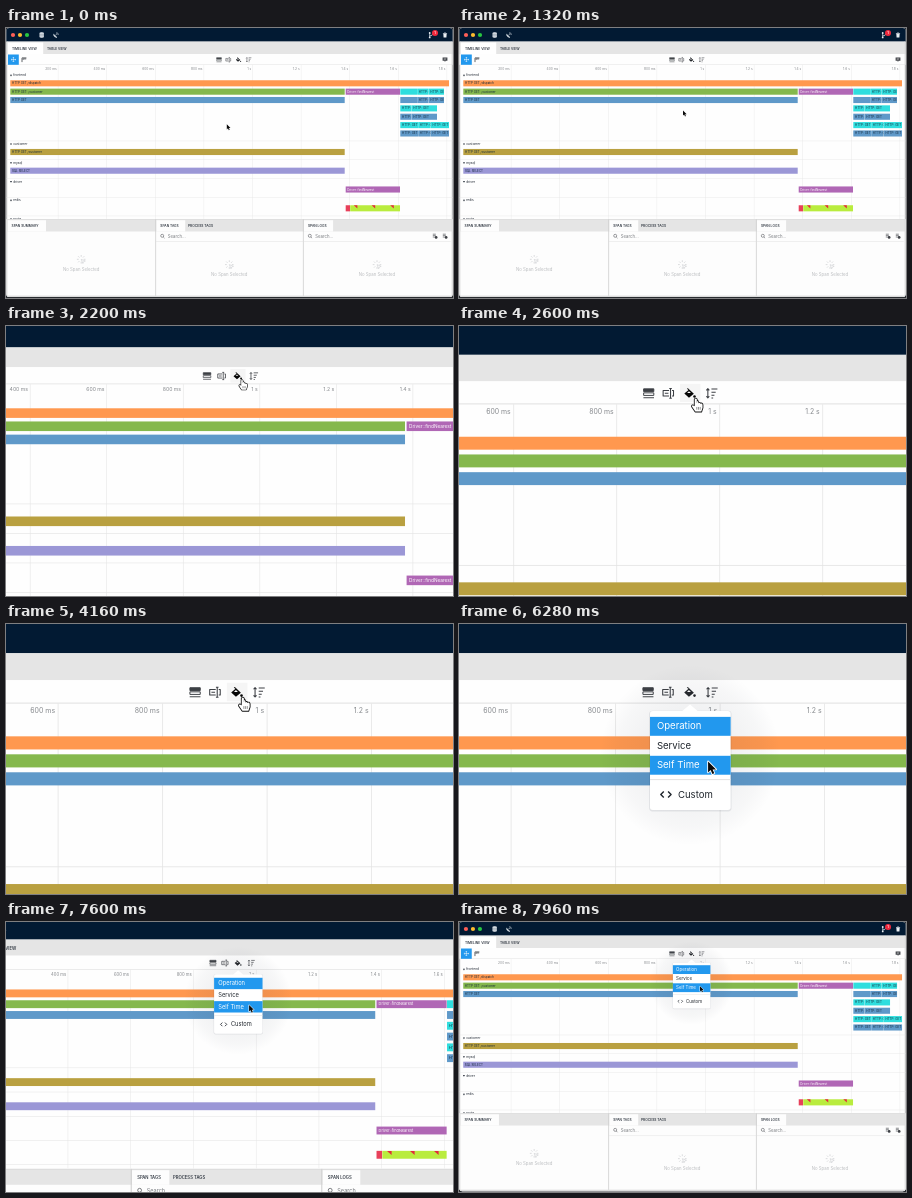
An HTML page with a canvas for the animation above (8 s loop, 447 by 270 pixels).

```html
<!DOCTYPE html>
<html lang="en">
<head>
<meta charset="utf-8">
<title>Trace timeline</title>
<style>
html, body { margin: 0; width: 100%; height: 100%; overflow: hidden; background: #fff; }
canvas { display: block; width: 447px; height: 270px; }
</style>
</head>
<body>
<canvas id="stage"></canvas>
<script>
const W = 447, H = 270, LOOP = 8000, STEP = 40;
const canvas = document.getElementById('stage');
const ctx = canvas.getContext('2d');
const dpr = window.devicePixelRatio || 1;
canvas.width = W * dpr;
canvas.height = H * dpr;

const C = {
  navy: '#021a33', grey: '#e5e5e5', line: '#dadada', ink: '#1d2530', icon: '#3c3f44',
  blue: '#2298ee', orange: '#ff984f', green: '#85b84d', steel: '#5f99c9', gold: '#b9a040',
  lavender: '#9b97d6', purple: '#b067b5', cyan: '#2fdede', lime: '#b9ec3e', red: '#e8405a'
};

// Motion
const progress = (t, a, b) => Math.min(1, Math.max(0, (t - a) / (b - a)));
const easeInOut = u => u < 0.5 ? 2 * u * u : 1 - 2 * (1 - u) * (1 - u);
const easeOutBack = u => 1 + 2 * (u - 1) ** 3 + (u - 1) ** 2;
const lerp = (a, b, u) => a + (b - a) * u;

const FOCUS_X = 233.8, ZOOM = 1.15;
const zoomAt = t => 1 + ZOOM *
  (easeInOut(progress(t, 1680, 2720)) - easeInOut(progress(t, 6930, 7970)));

// time, x, y of the pointer tip
const POINTER = [
  [1120, 220.8, 96.3], [1720, 235.2, 34.2], [5120, 235.2, 34.2],
  [5840, 240.8, 63.5], [6700, 241, 64.3], [LOOP, 241, 64.3]
];
function pointerAt(t) {
  if (t <= POINTER[0][0]) return { x: POINTER[0][1], y: POINTER[0][2] };
  const i = POINTER.findIndex(k => t <= k[0]);
  const a = POINTER[i - 1], b = POINTER[i];
  const u = easeInOut(progress(t, a[0], b[0]));
  return { x: lerp(a[1], b[1], u), y: lerp(a[2], b[2], u) };
}

// Drawing helpers
function rect(x, y, w, h, color) {
  ctx.fillStyle = color;
  ctx.fillRect(x, y, w, h);
}

function dot(x, y, r, color) {
  ctx.fillStyle = color;
  ctx.beginPath();
  ctx.arc(x, y, r, 0, Math.PI * 2);
  ctx.fill();
}

// Large font scaled down, so that small sizes keep exact advances.
function text(str, x, y, size, color, align = 'left', weight = 400) {
  ctx.save();
  ctx.translate(x, y);
  ctx.scale(0.1, 0.1);
  ctx.font = `${weight} ${size * 10}px Inter, "Open Sans", sans-serif`;
  ctx.textAlign = align;
  ctx.textBaseline = 'middle';
  ctx.fillStyle = color;
  ctx.fillText(str, 0, 0);
  ctx.restore();
}

function icon(d, x, y, { stroke, fill, width = 0.5 }) {
  const path = new Path2D(d);
  ctx.save();
  ctx.translate(x, y);
  ctx.lineWidth = width;
  ctx.lineJoin = 'round';
  if (stroke) { ctx.strokeStyle = stroke; ctx.stroke(path); }
  if (fill) { ctx.fillStyle = fill; ctx.fill(path); }
  ctx.restore();
}

const BAR_H = 6.1;
function bar(x, end, cy, color, label = '', labelColor = '#14283a') {
  const top = cy - BAR_H / 2;
  rect(x, top, end - x, BAR_H, color);
  if (!label) return;
  ctx.save();
  ctx.beginPath();
  ctx.rect(x, top, end - x, BAR_H);
  ctx.clip();
  text(label, x + 1.6, cy + 0.1, 3, labelColor);
  ctx.restore();
}

// Scene parts
function titleBar() {
  rect(0, 0, W, 13.6, C.navy);
  ['#ff5f57', '#febc2e', '#28c840'].forEach((c, i) => dot(7 + i * 7, 7, 2.1, c));
  const white = '#e9eef3';
  icon('M-2.2-2A2.2 .8 0 0 1 2.2-2V2A2.2 .8 0 0 1-2.2 2Z', 35.7, 7, { fill: white });
  icon('M-2.2-.8H2.2M-2.2 .9H2.2', 35.7, 7, { stroke: C.navy, width: 0.35 });
  icon('M-2.4-.8A3 3 0 0 0 1 2.4ZM-.6 .2L.8-1.2', 50, 7, { stroke: white, fill: white });
  icon('M.3-2.4A2.3 2.3 0 0 1 2.5-.2M.4-1.1A1 1 0 0 1 1.3-.2', 50, 7, { stroke: white });
  icon('M-1.3-1.8V2.2M-1.3 .8C1.2 .8 1.4 .2 1.4-1.2', 425, 7, { stroke: white, width: 0.7 });
  dot(423.7, 5, 0.9, white);
  dot(423.7, 9.4, 0.9, white);
  dot(429, 5, 3, '#f0283c');
  text('1', 429, 5.1, 3.4, '#fff', 'center', 600);
  icon('M-1.7-1.2H1.7L1.4 2.5H-1.4ZM-2.1-2.1H2.1V-1.5H-2.1ZM-.7-2.6H.7V-2H-.7Z', 439, 7, { fill: white });
}

function toolbar(hover) {
  rect(0, 13.6, W, 12.5, C.grey);
  rect(1.5, 14.4, 35.7, 11.7, '#fff');
  text('TIMELINE VIEW', 6, 20.9, 3.3, C.ink, 'left', 500);
  text('TABLE VIEW', 41, 20.9, 3.3, C.ink, 'left', 500);
  rect(0, 26.1, W, 10.7, '#fefefe');
  rect(0, 36.6, W, 0.35, '#d4d4d4');
  rect(2, 26.5, 10.8, 10.3, C.blue);
  icon('M-2.4 0H2.4M0-2.4V2.4M-1.7-.6L-2.4 0L-1.7 .6M1.7-.6L2.4 0L1.7 .6M-.6-1.7L0-2.4L.6-1.7M-.6 1.7L0 2.4L.6 1.7',
    7.4, 31.6, { stroke: '#fff' });
  icon('M-2 2.4V-1.8H2.4M-1 0V-.8H2.2', 18, 31.7, { stroke: C.icon, width: 0.8 });
  icon('M-2.4-2.1H2.4V1.2H.6L0 2.4L-.6 1.2H-2.4Z', 439, 31.6, { fill: C.icon });
  icon('M-1.3-.9H1.3M-1.3 .1H.8', 439, 31.6, { stroke: '#fff', width: 0.4 });

  if (hover) rect(227.8, 27.3, 9.6, 8.6, '#f5f5f5');
  const y = 31.75;
  icon('M-2.4-2.1H2.4V-.8H-2.4ZM-2.4-.2H2.4V1H-2.4ZM-2.5 2.1H2.5', 213, y, { stroke: C.icon, width: 0.45 });
  rect(210.6, y - 2.1, 4.8, 1.3, C.icon);
  icon('M.4-1.3H-2.4V1.3H.4M1.1-2.3V2.3M.5-2.3H1.7M.5 2.3H1.7M1.8-1.3H2.5V1.3H1.8M-1.6 0H.1',
    222.2, y, { stroke: C.icon, width: 0.5 });
  const ink = hover ? '#050505' : '#25282c';
  icon('M-.9-2.4L1.9 .2L-.4 2.1L-2.6 .1L-.6-1.6L-1.4-2.1Z', 232.4, y, { fill: ink });
  icon('M-1.3-.1L-.4-1L.5-.1Z', 232.4, y, { fill: '#fff' });
  dot(234.6, 33.3, 0.6, ink);
  icon('M-1.9-2.2V2.2M-2.6-1.4L-1.9-2.2L-1.2-1.4M-2.6 1.4L-1.9 2.2L-1.2 1.4M-.2-2H2.6M-.2-.5H1.8M-.2 .9H1.2M-.2 2.2H.6',
    242.8, y, { stroke: C.icon, width: 0.5 });
}

function axis() {
  for (let i = 1; i < 10; i++) {
    const x = 3.5 + i * 48.6;
    rect(x - 0.2, 36.9, 0.4, 154, '#e6e6e6');
    const label = i < 5 ? `${i * 200} ms` : `${i / 5} s`;
    text(label, x - 1.4, 40.6, 3.25, '#85888c', 'right');
  }
}

function timeline() {
  ['frontend', 'customer', 'mysql', 'driver', 'redis', 'route'].forEach((name, i) => {
    const y = i ? 97.4 + i * 18.75 : 47.4;
    if (i) rect(0, y - 3.4, W, 0.4, '#e4e4e4');
    icon('M-1-.7H1L0 1Z', 5, y, { fill: C.ink });
    text(name, 7.2, y, 3.2, C.ink);
  });

  const split = 338.7, call = 339.7, tail = 394.3;
  const row = i => 55.3 + i * 8.36;
  bar(4.3, 443, row(0), C.orange, 'HTTP GET /dispatch');
  bar(4.3, split, row(1), C.green, 'HTTP GET: /customer');
  bar(call, 394, row(1), C.purple, 'Driver::findNearest', '#fff');
  bar(4.3, split, row(2), C.steel, 'HTTP GET');

  const wide = [[tail, 411], [411.2, 422.4, 1], [422.6, 438, 1]];
  const short = [[tail, 405.4, 1], [405.6, 431, 1]];
  const full = [[tail, 412, 1], [412.2, 424.6, 1], [424.8, 443, 1]];
  [wide, wide, short, short, full, full].forEach((parts, i) => {
    for (const [x, end, named] of parts)
      bar(x, end, row(i + 1), i % 2 ? C.steel : C.cyan, named ? 'HTTP: GET' : '');
  });

  bar(4.3, split, 124, C.gold, 'HTTP GET /customer');
  bar(4.3, split, 142.7, C.lavender, 'SQL SELECT');
  bar(call, 394, 161.5, C.purple, 'Driver::findNearest', '#fff');
  bar(call, 344, 180.3, C.red);
  bar(344.2, 394, 180.3, C.lime);
  for (const x of [347.8, 365.6, 384.2])
    icon('M0 0H3.6V3.2Z', x, 177.3, { fill: '#e32b3c' });
}

function emptyState(x, y) {
  const grey = '#c3c5c8';
  ctx.strokeStyle = grey;
  ctx.lineWidth = 0.6;
  ctx.beginPath();
  for (let i = 0; i < 8; i++) {
    const a = i * Math.PI / 4, c = Math.cos(a), s = Math.sin(a);
    if (i === 1) continue;
    ctx.moveTo(x + c * 2.5, y + s * 2.5);
    ctx.lineTo(x + c * 4.3, y + s * 4.3);
  }
  ctx.stroke();
  icon('M0 0L4.2 1.7L2.4 2.4L1.7 4.2Z', x, y, { stroke: grey, width: 0.5 });
  text('No Span Selected', x, y + 10.2, 4.3, '#b9bbbe', 'center');
}

function searchRow(x) {
  rect(x, 213.6, 147, 0.4, C.line);
  icon('M1.2-.4A1.5 1.5 0 1 1-1.8-.4A1.5 1.5 0 1 1 1.2-.4M.8 .8L2 2', x + 6.4, 208.2, { stroke: C.icon, width: 0.5 });
  text('Search...', x + 11.6, 208.5, 4.3, '#777a7e');
}

function panels() {
  rect(0, 191.2, W, 79, '#fdfdfd');
  rect(0, 191.2, W, 12.3, C.grey);
  rect(0, 191.2, W, 0.4, '#cfcfcf');
  const tabs = [[1.5, 38.5, 'SPAN SUMMARY'], [150.3, 28.9, 'SPAN TAGS'], [297.9, 29.2, 'SPAN LOGS']];
  for (const [x, w, name] of tabs) {
    rect(x, 192.2, w, 11.4, '#fdfdfd');
    text(name, x + 4, 198.2, 3.3, C.ink, 'left', 500);
  }
  text('PROCESS TAGS', 182, 198.2, 3.3, C.ink, 'left', 500);
  rect(149.3, 191.2, 0.8, 78, '#cfcfcf');
  rect(296.9, 191.2, 0.8, 78, '#cfcfcf');
  searchRow(150.1);
  searchRow(297.7);
  for (const x of [429, 439]) {
    icon('M-2.2-2H.8M-2.2-.6H.8M-2.2 .8H-.4', x, 208.2, { stroke: C.icon, width: 0.6 });
    dot(x + 1.1, 209.4, 1.4, C.icon);
  }
  emptyState(75.2, 231.3);
  emptyState(223.3, 236.6);
  emptyState(371, 236.6);
}

function menu(t, pointer) {
  const u = progress(t, 4180, 4500);
  if (!u) return;
  const tipX = 232.5, tipY = 37.4, left = 213.9, top = 40.5, w = 37.5;
  const scale = easeOutBack(u);
  ctx.save();
  ctx.globalAlpha = Math.min(1, u * 2);
  ctx.translate(tipX, tipY);
  ctx.scale(scale, scale);
  ctx.translate(-tipX, -tipY);

  const halo = ctx.createRadialGradient(tipX, 61, 14, tipX, 61, 42);
  halo.addColorStop(0, 'rgba(20,30,50,.07)');
  halo.addColorStop(0.7, 'rgba(20,30,50,.03)');
  halo.addColorStop(1, 'rgba(20,30,50,0)');
  dot(tipX, 61, 42, halo);
  ctx.fillStyle = 'rgba(20,30,50,.09)';
  ctx.beginPath();
  ctx.roundRect(left - 0.4, top - 0.2, w + 0.8, 46.9, 1.6);
  ctx.fill();
  ctx.fillStyle = '#fff';
  ctx.beginPath();
  ctx.roundRect(left, top, w, 46, 1.3);
  ctx.fill();
  icon('M-4 3.4L0 0L4 3.4Z', tipX, tipY, { fill: '#fff' });

  ['Operation', 'Service', 'Self Time'].forEach((name, i) => {
    const y = 43.2 + i * 9.05, h = 8.8;
    const over = pointer.y >= y && pointer.y < y + 9.05;
    const lit = i === 0 || over;
    if (lit) rect(left, y, w, h, C.blue);
    text(name, 217.1, y + 4.5, 4.45, lit ? '#fff' : '#20262d');
  });
  rect(left, 72.2, w, 0.4, '#dcdcdc');
  icon('M-1-1.4L-2.4 0L-1 1.4M1-1.4L2.4 0L1 1.4', 221.3, 79.3, { stroke: '#20262d', width: 0.65 });
  text('Custom', 226.9, 79.4, 4.45, '#20262d');
  ctx.restore();
}

const ARROW = 'M0 0V5.1L1.2 4L2 5.9L2.9 5.5L2.1 3.7H3.7Z';
const HAND = 'M-.5 .4Q0-.4 .5 .4V2.2Q1-.1 1.3 2.3Q1.9 1.7 2.2 2.5Q3 2 3.2 3V4.4L2.6 6.2H-.2L-1.8 3.8Q-1.8 2.9-.9 3.4L-.5 3.7Z';
function drawPointer({ x, y }, hover) {
  if (hover) {
    icon(HAND, x, y, { stroke: '#111', width: 0.8 });
    icon(HAND, x, y, { fill: '#fff' });
    icon('M.5 4V5.3M1.3 4V5.3M2.1 4V5.3', x, y, { stroke: '#333', width: 0.25 });
  } else {
    icon(ARROW, x, y, { stroke: '#fff', width: 0.8 });
    icon(ARROW, x, y, { fill: '#0a0a0a' });
  }
}

function render(t) {
  const s = zoomAt(t), p = pointerAt(t);
  const hover = p.x > 227.5 && p.x < 239 && p.y > 27 && p.y < 37;
  ctx.setTransform(dpr, 0, 0, dpr, 0, 0);
  rect(0, 0, W, H, '#2a2d31');
  ctx.setTransform(s * dpr, 0, 0, s * dpr, FOCUS_X * (1 - s) * dpr, 0);
  ctx.save();
  ctx.beginPath();
  ctx.roundRect(0.4, 0, W - 0.8, H - 0.9, 3);
  ctx.clip();
  rect(0, 0, W, H, '#fefefe');
  titleBar();
  toolbar(hover);
  axis();
  timeline();
  panels();
  rect(0.4, 13.6, 1, 256, '#dcdcdc');
  rect(W - 1.4, 13.6, 1, 256, '#dcdcdc');
  rect(0, 267.6, W, 2, '#dcdcdc');
  ctx.restore();
  menu(t, p);
  drawPointer(p, hover);
}

function tick() {
  const t = performance.now() % LOOP;
  render(Math.floor(t / STEP) * STEP);
  requestAnimationFrame(tick);
}
tick();
</script>
</body>
</html>
```
